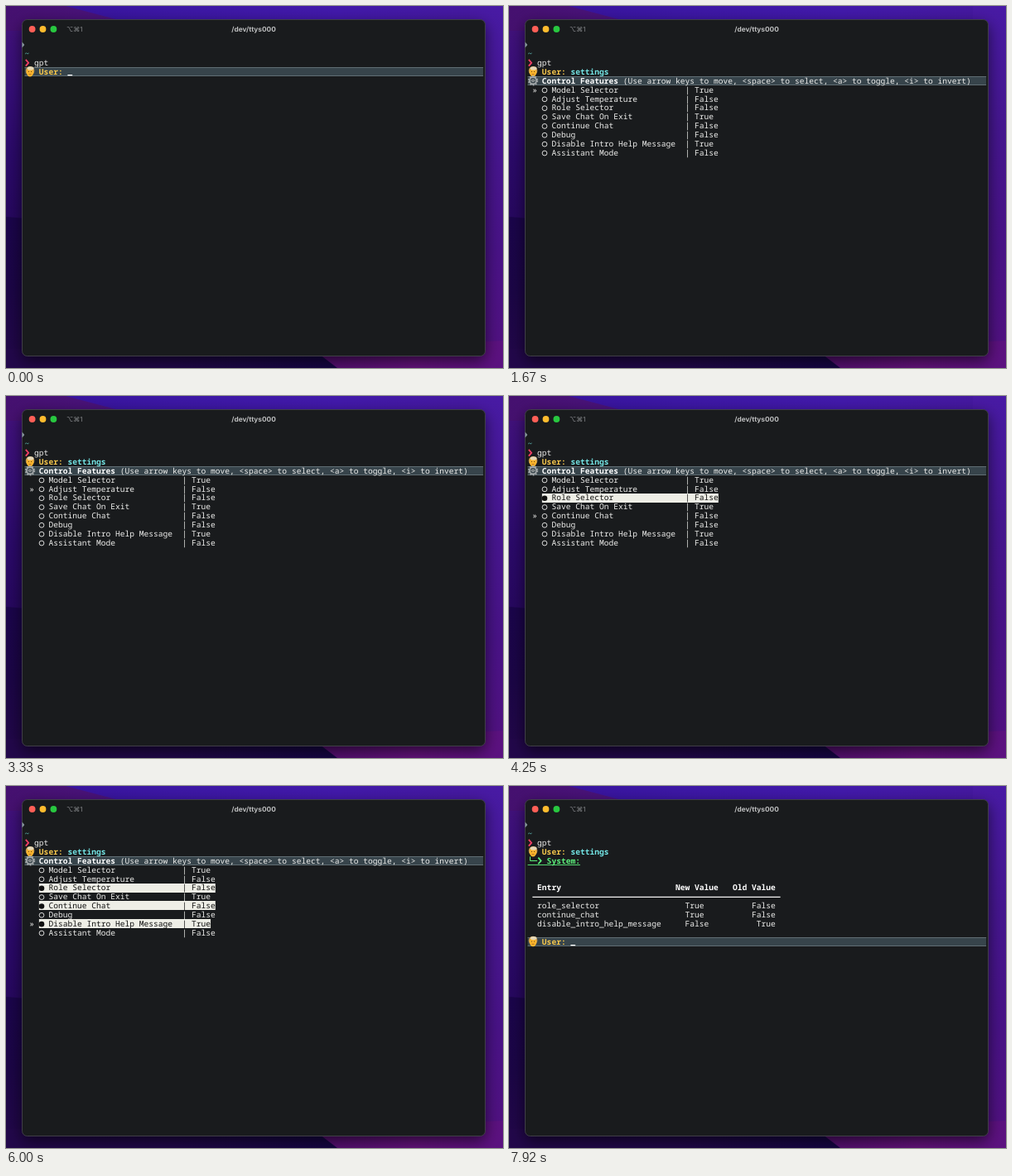
An HTML page with a canvas that plays this animation: 600 by 438 pixels, repeating every 8 s.

```html
<!DOCTYPE html>
<html lang="en">
<head>
<meta charset="utf-8">
<title>Terminal settings menu</title>
<style>
html, body { margin: 0; width: 100%; height: 100%; overflow: hidden; background: #2b0f6b; }
canvas { display: block; }
</style>
</head>
<body>
<canvas id="stage" width="600" height="438"></canvas>
<script>
const ctx = document.getElementById('stage').getContext('2d');
const LOOP = 8000;
const CELL = 5.755, LINE = 10.87, LEFT = 22.6, FIRST_ROW = 47;
const TEXT = '#eeeeec', DARK = '#191b1d', YELLOW = '#f8c94c', CYAN = '#73e6e6', GREEN = '#5df27c';

const COMMAND = 'settings';
const KEY_TIMES = [420, 500, 580, 750, 830, 920, 1080, 1170];
const MENU_AT = 1580, RESULT_AT = 7420;

const OPTIONS = [
  ['Model Selector', 'True'],
  ['Adjust Temperature', 'False'],
  ['Role Selector', 'False'],
  ['Save Chat On Exit', 'True'],
  ['Continue Chat', 'False'],
  ['Debug', 'False'],
  ['Disable Intro Help Message', 'True'],
  ['Assistant Mode', 'False'],
];
// [time, option under the pointer]
const POINTER = [[MENU_AT, 0], [2000, 1], [2250, 2], [3000, 1], [3580, 2], [4080, 3], [4250, 4], [4830, 5], [5000, 6]];
// option index: time it is ticked
const TICKED_AT = { 2: 3830, 4: 4580, 6: 5500 };

const RESULTS = [
  ['role_selector', 'True', 'False'],
  ['continue_chat', 'True', 'False'],
  ['disable_intro_help_message', 'False', 'True'],
];

const colX = col => LEFT + col * CELL;
const rowY = row => FIRST_ROW + row * LINE;
const rowTop = row => Math.round(rowY(row) - LINE / 2);

function text(col, row, string, color = TEXT, weight = 400) {
  ctx.font = `${weight} 9.59px "Noto Sans Mono", "DejaVu Sans Mono", monospace`;
  ctx.textAlign = 'left';
  ctx.fillStyle = color;
  [...string].forEach((char, i) => {
    if (char !== ' ') ctx.fillText(char, colX(col + i), rowY(row) + 3.3);
  });
}

function cells(col, row, count, color) {
  ctx.fillStyle = color;
  ctx.fillRect(colX(col), rowTop(row), count * CELL, 11);
}

function polygon(color, ...points) {
  ctx.fillStyle = color;
  ctx.beginPath();
  points.forEach(([x, y]) => ctx.lineTo(x, y));
  ctx.fill();
}

function stroke(color, width, ...points) {
  ctx.strokeStyle = color;
  ctx.lineWidth = width;
  ctx.beginPath();
  points.forEach(([x, y]) => ctx.lineTo(x, y));
  ctx.stroke();
}

function oval(x, y, rx, ry, color) {
  ctx.fillStyle = color;
  ctx.beginPath();
  ctx.ellipse(x, y, rx, ry, 0, 0, 7);
  ctx.fill();
}

function ring(x, y, r, color, width, dash = []) {
  ctx.strokeStyle = color;
  ctx.lineWidth = width;
  ctx.setLineDash(dash);
  ctx.beginPath();
  ctx.arc(x, y, r, 0, 2 * Math.PI);
  ctx.stroke();
  ctx.setLineDash([]);
}

function linear(x0, y0, x1, y1, ...colors) {
  const gradient = ctx.createLinearGradient(x0, y0, x1, y1);
  colors.forEach((color, i) => gradient.addColorStop(i / (colors.length - 1), color));
  return gradient;
}

function wallpaper() {
  ctx.fillStyle = linear(0, 0, 600, 0, '#35129a', '#3c17a4', '#4219aa', '#45189c');
  ctx.fillRect(0, 0, 600, 438);
  polygon(linear(0, 0, 135, 0, '#45106f', '#4a137c'), [0, 0], [72, 0], [140, 18], [140, 40], [0, 40]);
  polygon(linear(0, 30, 0, 255, '#40117a', '#340d76', '#2a0968', '#26075e'), [0, 30], [60, 30], [60, 280], [0, 255]);
  polygon(linear(0, 255, 0, 438, '#1a044a', '#1b0545', '#220749'), [0, 255], [60, 260], [60, 438], [0, 438]);
  polygon(linear(560, 0, 560, 438, '#481aa4', '#45168f', '#481286', '#521180'), [560, 0], [600, 0], [600, 438], [560, 438]);
  polygon(linear(0, 0, 400, 0, '#22074a', '#200748', '#150543'), [0, 415], [420, 415], [420, 438], [0, 438]);
  polygon(linear(385, 0, 600, 0, '#550f70', '#64127c', '#5b1180'), [370, 415], [600, 405], [600, 438], [400, 438]);
}

function terminalWindow() {
  ctx.save();
  ctx.shadowColor = 'rgba(0,0,0,.6)';
  ctx.shadowBlur = 18;
  ctx.shadowOffsetY = 6;
  ctx.fillStyle = DARK;
  ctx.beginPath();
  ctx.roundRect(19.5, 16.5, 559, 407, 6);
  ctx.fill();
  ctx.restore();
  ctx.strokeStyle = '#403e48';
  ctx.lineWidth = 1;
  ctx.stroke();

  ['#ff5f57', '#febc2e', '#28c840'].forEach((color, i) => oval(31.6 + 12.9 * i, 28, 3.9, 3.9, color));
  ctx.fillStyle = '#85878a';
  ctx.textAlign = 'left';
  ctx.font = '8px Inter, "DejaVu Sans", sans-serif';
  ctx.fillText('⌥⌘1', 73, 31);
  ctx.fillStyle = '#bcbdbe';
  ctx.textAlign = 'center';
  ctx.font = '700 8.3px Inter, sans-serif';
  ctx.fillText('/dev/ttys000', 299, 31);

  polygon('#8a9aa2', [19.5, 43.5], [22.3, 47], [19.5, 50.5]);
}

function cursorGuide(row) {
  const top = rowTop(row);
  ctx.fillStyle = '#37444b';
  ctx.fillRect(LEFT, top, 553.5, 11);
  ctx.fillStyle = '#606d73';
  ctx.fillRect(LEFT, top, 553.5, 1);
  ctx.fillRect(LEFT, top + 10, 553.5, 1);
}

function underscore(col, row) {
  ctx.fillStyle = '#ffffff';
  ctx.fillRect(colX(col), rowTop(row) + 9, CELL, 1.3);
}

function chevron(col, row, color) {
  const x = colX(col) + 1.2, y = rowY(row);
  stroke(color, 1.8, [x, y - 3.8], [x + 3.3, y], [x, y + 3.8]);
}

function userPrompt(row, typed = '') {
  const y = rowY(row);
  oval(29, y - 1.2, 5.3, 5.4, '#c99a4c');
  oval(29, y + 0.6, 4.1, 5.4, '#fbb52c');
  oval(29.6, y - 4.2, 3.9, 2.1, '#e6d8b8');
  oval(27.4, y - 0.2, 0.6, 0.7, '#69431c');
  oval(30.6, y - 0.2, 0.6, 0.7, '#69431c');
  stroke('#a85d23', 0.8, [27.5, y + 3], [30.5, y + 3]);
  text(3, row, 'User:', YELLOW, 700);
  text(9, row, typed, CYAN, 700);
}

function gear(row) {
  const y = rowY(row) - 0.3;
  ring(29, y, 5.4, '#a2a7a9', 1.6, [1.8, 1.6]);
  ring(29, y, 4.1, '#a9adaf', 1.7);
  ring(29, y, 1.4, '#8d9294', 1.3);
  stroke('#8d9294', 0.9, [25.5, y], [32.5, y]);
}

function inputScreen(time) {
  const typed = COMMAND.slice(0, KEY_TIMES.filter(t => t <= time).length);
  const end = 9 + typed.length;
  cursorGuide(3);
  userPrompt(3, typed);
  underscore(end, 3);
  if (!typed) return;
  cells(end, 4, 10, '#b9b9b9');
  cells(end + 10, 4, 28, '#888888');
  cells(end + 38, 4, 1, '#444546');
  text(end + 1, 4, COMMAND, '#62f4f4', 700);
  text(end + 11, 4, 'Manage available features.', '#050505');
}

function menuScreen(time) {
  const pointed = POINTER.filter(([t]) => t <= time).pop()[1];
  userPrompt(3, COMMAND);
  cursorGuide(4);
  gear(4);
  text(3, 4, 'Control Features', '#ffffff', 700);
  text(20, 4, '(Use arrow keys to move, <space> to select, <a> to toggle, <i> to invert)');
  OPTIONS.forEach(([label, value], i) => {
    const row = 5 + i, ticked = time >= TICKED_AT[i];
    const color = ticked ? '#111111' : TEXT;
    if (ticked) cells(3, row, 32 + value.length, '#eeeee6');
    if (i === pointed) text(1, row, '»');
    if (ticked) oval(43, rowY(row) + 0.6, 3.3, 3.3, color);
    else ring(43, rowY(row) + 0.6, 2.9, color, 0.9);
    text(5, row, label, color);
    text(33, row, '|', color);
    text(35, row, value, color);
  });
}

function resultScreen() {
  userPrompt(3, COMMAND);
  const y = rowY(4);
  stroke(GREEN, 1, [colX(0) + 2.9, y - 5], [colX(0) + 2.9, y], [colX(2), y]);
  chevron(2, 4, GREEN);
  text(4, 4, 'System:', GREEN, 700);
  stroke(GREEN, 0.9, [colX(0), y + 5], [colX(11), y + 5]);

  text(2, 7, 'Entry', '#ffffff', 700);
  text(31, 7, 'New Value', '#ffffff', 700);
  text(43, 7, 'Old Value', '#ffffff', 700);
  stroke('#f4f4f2', 1.3, [colX(1), rowY(8) + 0.4], [colX(53), rowY(8) + 0.4]);
  RESULTS.forEach(([entry, fresh, old], i) => {
    text(2, 9 + i, entry);
    text(33, 9 + i, fresh);
    text(52 - old.length, 9 + i, old);
  });
  cursorGuide(13);
  userPrompt(13);
  underscore(9, 13);
}

function draw(time) {
  wallpaper();
  terminalWindow();
  text(0, 1, '~', '#62c2bf');
  chevron(0, 2, '#ff3f68');
  text(2, 2, 'gpt');
  if (time < MENU_AT) inputScreen(time);
  else if (time < RESULT_AT) menuScreen(time);
  else resultScreen();
}

ctx.textRendering = 'geometricPrecision';
const start = performance.now();
function tick() {
  draw((performance.now() - start) % LOOP);
  requestAnimationFrame(tick);
}
tick();
</script>
</body>
</html>
```
